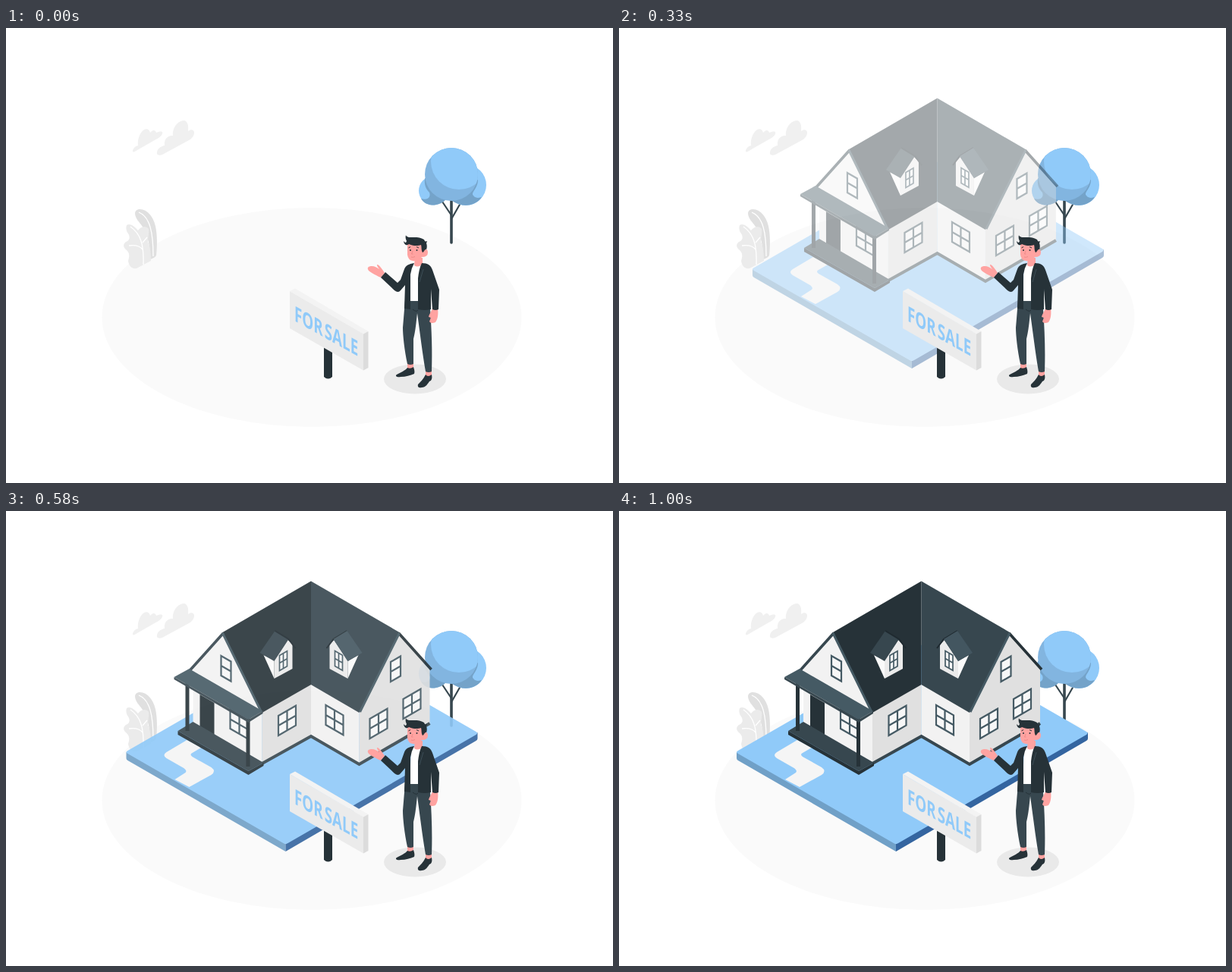
An HTML page for the animation above (1040 ms loop, 800 by 600 pixels).

```html
<!DOCTYPE html>
<html lang="en">
<head>
<meta charset="utf-8">
<title>House for sale</title>
<style>
  html, body { margin: 0; width: 100%; height: 100%; overflow: hidden; background: #fff; }
  svg { display: block; width: 800px; height: 600px; }
  .line { fill: none; }
  .ink { fill: #263238; }
  .slate { fill: #37474f; }
  .pale { fill: #f2f2f2; }
  .grey { fill: #e0e0e0; }
  .skin { fill: #ffa3a1; }
  .sky { fill: #90caf9; }
  .win { fill: #f7f7f7; stroke: #455a64; stroke-width: 2.2; }
  .small { stroke-width: 1.7; }
  .sign { font: 700 28px "Open Sans", "Noto Sans", sans-serif; word-spacing: -4px; fill: #90caf9; }
</style>
</head>
<body>
<svg viewBox="0 0 800 600">
  <ellipse cx="403" cy="381.5" rx="276.5" ry="144.5" fill="#fafafa"/>

  <!-- clouds -->
  <g fill="#f0f0f0">
    <path d="M167 163C167 159 170 156 174 155C173 148 176 138 182 134C186 132 189 134 190 138C193 134 197 134 198 138C201 137 203 136 206 137C207 140 204 143 201 145L173 161C170 163 168 164 167 163Z"/>
    <path d="M199 166C198 161 203 156 209 155C208 148 212 141 220 142C219 132 226 122 235 122C239 123 241 128 240 136C244 133 248 134 248 138C248 142 245 146 241 148L206 167C203 168 200 168 199 166Z"/>
  </g>

  <!-- plant -->
  <path class="grey" d="M170 244C171 238 178 238 184 241C197 249 201 268 198 300C196 303 193 304 190 305C190 290 188 275 180 262C175 255 170 251 170 244Z"/>
  <path fill="#ebebeb" d="M159 260C163 257 169 261 174 267C178 262 184 260 188 265C189 270 187 276 187 282C190 287 191 300 191 307L172 317C166 318 162 314 161 307C163 301 163 297 159 293C154 289 154 285 158 282C163 280 164 276 161 271C158 267 158 263 159 260Z"/>
  <path class="line" stroke="#fff" stroke-width="1.3" d="M175 243C190 249 194 270 194 301M164 262C177 271 182 285 181 312M162 287C170 286 177 288 180 292M180 283L186 276"/>

  <!-- tree -->
  <path class="line" stroke="#37474f" stroke-width="3.6" stroke-linecap="round" d="M587 222V283"/>
  <path class="line" stroke="#37474f" stroke-width="2.2" d="M575 229L587 247M599 231L587 252"/>
  <circle class="sky" cx="563" cy="214.5" r="19"/>
  <circle class="sky" cx="606" cy="207" r="27"/>
  <path fill="#74a3c9" d="M552 198C551 206 553 212 558 217C560 222 557 228 547 225C553 236 570 236 579 227L590 214Z"/>
  <path fill="#74a3c9" d="M622 200C622 212 612 217 616 221C619 225 624 224 627 223C620 234 603 238 588 228L584 215Z"/>
  <circle fill="#82b5e0" cx="587" cy="193" r="35"/>
  <clipPath id="crown"><circle cx="587" cy="193" r="35"/></clipPath>
  <circle class="sky" cx="597" cy="176" r="37" clip-path="url(#crown)"/>

  <g id="house">
    <!-- lawn -->
    <path fill="#70a0c7" d="M155 318L365 439V449L157 329Q155 328 155 326Z"/>
    <path fill="#3465a0" d="M365 439L618 292V300Q618 302 616 303L365 449Z"/>
    <path class="sky" d="M157 320Q153 318 157 316L405 173H411L616 291Q619 293 616 295L368 438Q365 440 362 438Z"/>
    <path fill="#f5f5f5" d="M235 302L208 318Q202 322 208 326L229 338Q236 342 233 345L219 354L238 364L267 348Q274 343 267 338L242 324Q238 321 242 319L254 312Z"/>

    <!-- walls -->
    <path class="pale" d="M282 163L334 262V333L243 280V207Z"/>
    <path class="grey" d="M334 264L398.5 228V297L334 333Z"/>
    <path class="pale" d="M398.5 228L462 264V334L398.5 297Z"/>
    <path class="grey" d="M462 264L516 163L555 208V280L462 334Z"/>
    <path class="line" stroke="#37474f" stroke-width="4" d="M334 333L398.5 297L462 334L555 280"/>
    <path class="ink" d="M252 242L271 253V295L252 284Z"/>
    <g id="windows"></g>

    <!-- roof -->
    <path class="ink" d="M282 160L398.5 92.5V229L334 266Z"/>
    <path class="slate" d="M515 160L398.5 92.5V229L462 266Z"/>
    <path class="line" stroke="#37474f" stroke-width="3.6" d="M283 161L239 210"/>
    <path class="line" stroke="#263238" stroke-width="3.6" d="M514 161L557 209"/>
    <path class="line" stroke="#455a64" stroke-width="3" d="M282 161L333 265M515 161L463 265"/>

    <!-- dormers -->
    <g id="dormer">
      <path fill="#fafafa" d="M336 190L350 197V221Z"/>
      <path fill="#ebebeb" d="M350 197L368 170L374 176V208L350 221Z"/>
      <path class="slate" d="M331 187L351 158L369 169L350 198Z"/>
      <path class="line" stroke="#1f2a30" stroke-width="2" d="M351 158L369 169L378 181"/>
    </g>
    <use href="#dormer" transform="matrix(-1 0 0 1 797 0)"/>
    <path fill="#435660" d="M466 187L446 158L428 169L447 198Z"/>
    <g id="dormerWindows"></g>

    <!-- porch -->
    <path class="slate" d="M223 290L243 278L336 332L316 343Z"/>
    <path class="ink" d="M223 290L316 343L336 332V336L316 348L223 295Z"/>
    <path class="line" stroke="#263238" stroke-width="5" d="M235.5 226V290M315.5 274V337"/>
    <path fill="#455a64" d="M218 219L238 208L335 264L316 275Z"/>
    <path class="slate" d="M218 219L316 275L335 264V267L316 279L218 222Z"/>
  </g>

  <!-- sign -->
  <path class="ink" d="M419 415H430V460Q424.500 465 419 460Z"/>
  <path fill="#ebebeb" d="M374 347L471 403V451.500L374 396Z"/>
  <path fill="#f3f3f3" d="M374 347L381 343.500L477.500 400L471 403.500Z"/>
  <path fill="#dcdcdc" d="M471 403.500L477.500 400V448L471 451.500Z"/>
  <text class="sign" transform="matrix(.67 .375 0 1 380 386)">FOR SALE</text>

  <!-- agent -->
  <ellipse cx="539" cy="463" rx="41" ry="19.500" fill="#e9e9e9"/>
  <path class="skin" d="M529 440H537V451H529ZM553 450H561V461H553Z"/>
  <path class="ink" d="M529 448C526 452 520 454 515 457C512 459 516 461 520 460C527 460 533 458 538 456C539 453 538 450 537 447Q533 450 529 448ZM553 457C550 463 546 467 543 470C542 474 545 475 548 474C553 474 556 469 558 466C561 465 562 462 561 457Q556 461 553 457Z"/>
  <path class="slate" d="M526 359H546L559 370C561 400 562 425 561 453Q557 455 553 453C549 430 546 405 542 376C540 395 539 402 537 410V443Q533 445 529 443C525 425 523 405 523 395Z"/>
  <path class="line" stroke="#263238" d="M536 371Q541 375 543 372"/>
  <path fill="#fff" d="M534 312L549 311L546 360H532Z"/>
  <path class="skin" d="M539 303H549V311Q543 317 538 313Z"/>
  <path class="skin" d="M494 329C489 327 482 323 478 320C475 316 478 314 482 314C486 314 489 316 492 318C489 314 488 312 490 312C493 314 496 318 499 323Z"/>
  <path class="skin" d="M562 370H569C570 377 569 384 566 388C562 390 559 389 558 387L560 382L557 381C558 377 560 375 562 370Z"/>
  <path class="ink" d="M538 310C531 311 527 313 525 318L520 332L516 336L500 322L494 329L512 346Q517 350 520 346L526 339L525 370L533 371V325Q534 317 538 310ZM548 310C556 310 560 313 562 319L571 345L570 371Q566 373 562 371L560 344V371Q552 373 543 371V330C544 322 545 316 548 310Z"/>
  <path class="line" stroke="#455a64" stroke-width=".7" d="M550 318L545 335"/>
  <path class="skin" d="M529 284V299Q530 306 536 307Q543 308 548 302Q556 302 556 296Q556 291 551 291L549 284Z"/>
  <path class="ink" d="M524 281C525 287 529 287 531 285C535 287 542 288 547 286C548 289 547 293 549 296C551 296 552 291 554 292C555 290 555 286 554 284L555 281C552 282 552 281 551 279C545 275 538 276 531 276C528 275 527 274 527 273C526 276 527 279 528 281C527 284 526 283 524 281Z"/>
  <path class="ink" d="M532 293a1 1 0 1 0 2 0a1 1 0 1 0-2 0M540.500 293a1 1 0 1 0 2 0a1 1 0 1 0-2 0"/>
  <path class="line" stroke="#263238" d="M530.500 290L533 288.500M541 288.500L544 290"/>
  <path class="line" stroke="#e98583" stroke-width=".8" d="M536 294L534.500 298H536.500M534 302Q536 303 539 301.500"/>
</svg>
<script>
  const FPS = 24, LOOP = 1040, SHIFT = 36;
  const byId = id => document.getElementById(id);

  // Window on an isometric wall; side is 1 for walls falling to the right, -1 for rising ones.
  function pane(x, y, w, h, side, split = true, cls = 'win') {
    const rise = w * side * .577;
    const mid = split ? `M${x + w / 2} ${y + rise / 2}v${h}` : '';
    return `<path class="${cls}" d="M${x} ${y}l${w} ${rise}v${h}l${-w} ${-rise}zM${x} ${y + h / 2}l${w} ${rise}${mid}"/>`;
  }

  byId('windows').innerHTML =
    pane(280, 191, 13, 26, 1, false) +
    pane(292, 262, 24, 25, 1) +
    pane(355.500, 270, 23, 26, -1) +
    pane(418, 256, 23, 26, 1) +
    pane(476, 274, 23, 26, -1) +
    pane(520, 248, 23, 26, -1) +
    pane(503.500, 199, 13, 26, -1, false);
  byId('dormerWindows').innerHTML =
    pane(357, 190.500, 10, 20, -1, true, 'win small') +
    pane(430, 184.500, 10, 20, 1, true, 'win small');

  const bezier = (a, b, s) => 3 * a * s * (1 - s) ** 2 + 3 * b * s * s * (1 - s) + s ** 3;

  // Ease with a slight overshoot: cubic-bezier(.36, -.01, .5, 1.38)
  function ease(u) {
    let lo = 0, hi = 1;
    for (let i = 0; i < 24; i++) {
      const s = (lo + hi) / 2;
      if (bezier(.36, .5, s) < u) lo = s; else hi = s;
    }
    return bezier(-.01, 1.38, lo);
  }

  const house = byId('house');
  const start = performance.now();

  function draw(now) {
    const t = Math.max(0, now - start) % LOOP;
    const step = Math.floor((t + 5) * FPS / 1000);
    const p = step ? ease(Math.min(1, step / FPS + .012)) : 0;
    house.setAttribute('transform', `translate(${SHIFT * (1 - p)} 0)`);
    house.setAttribute('opacity', Math.min(1, Math.max(0, p)));
    requestAnimationFrame(draw);
  }
  draw(start);
</script>
</body>
</html>
```
